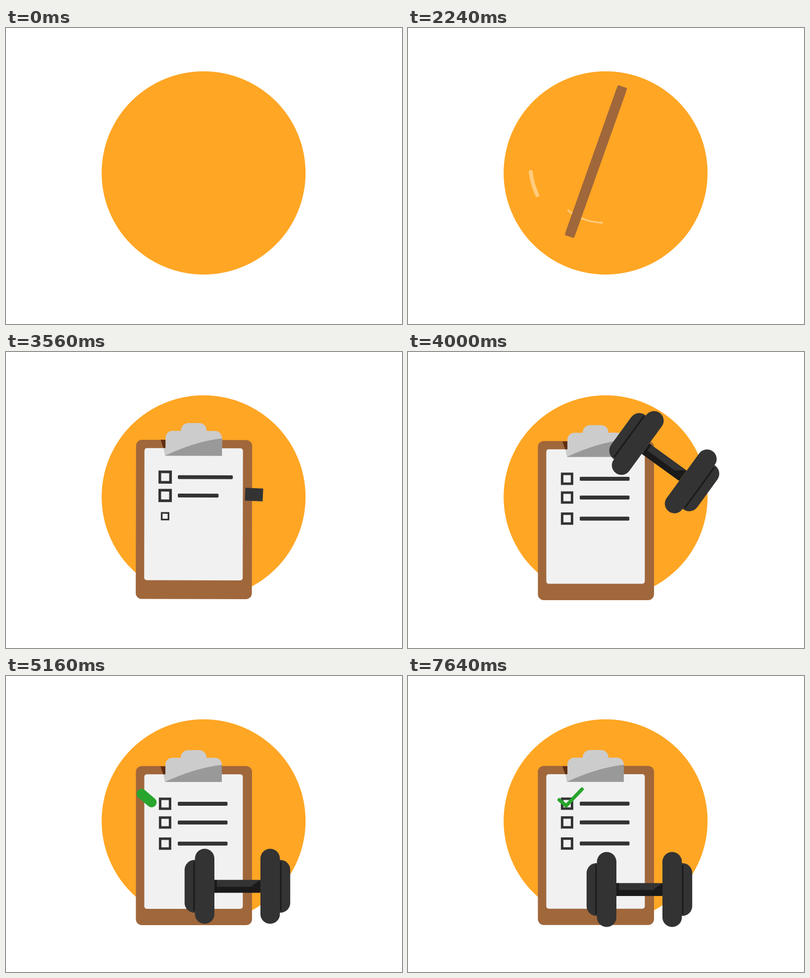
An HTML page with a canvas that plays this animation: 800x600 px, repeating every 7.68 s.

```html
<!DOCTYPE html>
<html lang="en">
<head>
<meta charset="utf-8">
<title>Workout checklist</title>
<style>
  html, body { margin: 0; width: 100%; height: 100%; overflow: hidden; background: #fff; }
  canvas { display: block; }
</style>
</head>
<body>
<canvas id="stage" width="800" height="600"></canvas>
<script>
const ctx = document.getElementById('stage').getContext('2d');
const LOOP = 7680, STEP = 40, TURN = 2 * Math.PI;
const DARK = '#333', SHADE = '#1a1a1a';
const rad = degrees => degrees * Math.PI / 180;

// Motion rules: each takes the time and returns a progress or an offset.
const progress = (t, start, end) => Math.min(1, Math.max(0, (t - start) / (end - start)));

function ease(t, start, end) {
  const u = progress(t, start, end);
  return u * u * (3 - 2 * u);
}

const fall = (t, start, end) => progress(t, start, end) ** 1.6;

function pop(t, start) {
  const u = Math.max(0, t - start) / 400;
  return 1 - Math.exp(-5 * u) * Math.cos(TURN * u);
}

function wobble(t, start, period) {
  const u = Math.max(0, t - start) / period;
  return Math.sin(TURN * u) * Math.exp(-0.9 * u);
}

// Drawing helpers.
function group(draw) {
  ctx.save();
  draw();
  ctx.restore();
}

function scaleAt(x, y, sx, sy) {
  ctx.translate(x, y);
  ctx.scale(sx, sy);
  ctx.translate(-x, -y);
}

function box(x, y, w, h, r, color) {
  ctx.fillStyle = color;
  ctx.beginPath();
  ctx.roundRect(x, y, w, h, r);
  ctx.fill();
}

function polygon(color, ...points) {
  ctx.fillStyle = color;
  ctx.beginPath();
  points.forEach(p => ctx.lineTo(...p));
  ctx.fill();
}

// A light arc whose head runs ahead of its tail.
function streak(t, start, duration, radius, width, from, sweep) {
  const u = (t - start) / duration;
  if (u <= 0 || u >= 1) return;
  ctx.strokeStyle = '#ffcb7c';
  ctx.lineWidth = width;
  ctx.lineCap = 'round';
  ctx.beginPath();
  ctx.arc(397, 275, radius, rad(from + sweep * ease(u, 0.35, 1)), rad(from + sweep * ease(u, 0, 0.65)));
  ctx.stroke();
}

function burst(t, start, duration, from, sweep) {
  streak(t, start, duration, 120, 3.5, from, sweep);
  streak(t, start, duration, 150, 8, from + sweep + 17, sweep * 0.52);
}

function drawStreaks(t) {
  burst(t, 80, 720, 180, 115);
  streak(t, 360, 600, 65, 3.5, -180, 133);
  burst(t, 1040, 560, -12, 87);
  burst(t, 2040, 400, 85.5, 49);
}

function drawRow(t, y, i) {
  const start = 3360 + 72 * i;
  const size = pop(t, start), length = pop(t, start + 57);
  if (size > 0) group(() => {
    scaleAt(321.4, y, size, size);
    ctx.strokeStyle = DARK;
    ctx.lineWidth = 5;
    ctx.strokeRect(311.4, y - 10, 20, 20);
  });
  if (length > 0) box(347, y - 4, 100.5 * length, 8, 2, DARK);
}

function drawPaper(t) {
  scaleAt(379, 199, 1, ease(t, 3100, 3600));
  box(279.4, 199, 199, 272.7, 5, '#f1f1f1');
  [258.8, 296.8, 339.6].forEach((y, i) => drawRow(t, y, i));
}

function drawClip(t) {
  scaleAt(379, 214.5, 1, pop(t, 3310));
  polygon('#5e2d12', [312, 183], [322, 183], [322, 200], [318, 200]);
  polygon('#ccc', [318, 199], [323, 199], [323, 214.5], [321, 214.5]);
  box(353, 150, 52, 30, [15, 15, 0, 0], '#ccc');
  box(322, 165.5, 114, 49, [14, 14, 0, 0], '#ccc');
  ctx.fillStyle = '#999';
  ctx.beginPath();
  ctx.moveTo(321, 214.5);
  ctx.quadraticCurveTo(382, 186, 436, 180);
  ctx.lineTo(436, 214.5);
  ctx.fill();
}

function drawBoard(t) {
  const y = 271 - 11 * ease(t, 2200, 2600) + 83.5 * fall(t, 2840, 3180) + 9.5 * wobble(t, 3180, 460);
  const tilt = 19.5 * (1 - ease(t, 2440, 2840)) - 1.5 * wobble(t, 2840, 260);
  ctx.translate(379.7, y);
  ctx.rotate(rad(tilt));
  ctx.scale(ease(t, 2200, 2420), 1);
  ctx.translate(-379.7, -343.5);
  box(262.4, 182.3, 234.6, 322.5, 12, '#a0673b');
  group(() => drawPaper(t));
  group(() => drawClip(t));
}

function drawPlates(t, side) {
  const outer = pop(t, 3740), inner = pop(t, 3620);
  ctx.scale(side, 1);
  group(() => {
    scaleAt(66, 0, outer, outer);
    box(64, -53.5, 42.7, 107, 20, DARK);
    box(86, -50, 3, 100, 1, SHADE);
  });
  group(() => {
    scaleAt(66, 0, inner, inner);
    box(46.5, -76, 39.3, 152, 19.6, DARK);
  });
}

function drawDumbbell(t) {
  const rise = ease(t, 3480, 3960), swing = ease(t, 4260, 4840);
  ctx.translate(499.7 + 18 * rise - 50.2 * swing,
    294.5 - 73.5 * rise + 212 * fall(t, 3960, 4640) + 15 * wobble(t, 4640, 640));
  ctx.rotate(rad(36 * (rise - swing)));
  group(() => {
    ctx.scale(pop(t, 3530), 1);
    box(-46.5, -13, 93, 26, 2, DARK);
    ctx.globalAlpha = ease(t, 3600, 3720);
    box(-46.5, -13, 5, 26, 0, SHADE);
    box(-46.5, 1, 93, 12, 0, SHADE);
    polygon(SHADE, [27, 1], [46.5, -13], [46.5, 1]);
  });
  [-1, 1].forEach(side => group(() => drawPlates(t, side)));
}

function drawCheck(t) {
  const drawn = 65 * ease(t, 5060, 5480);
  if (drawn <= 0) return;
  const size = 2.95 - 1.95 * ease(t, 5060, 5860);
  scaleAt(322.4, 257.5, size, size);
  ctx.strokeStyle = '#28a52c';
  ctx.lineWidth = 7;
  ctx.lineCap = ctx.lineJoin = 'round';
  ctx.setLineDash([drawn, 100]);
  ctx.beginPath();
  ctx.moveTo(305.5, 251);
  ctx.lineTo(319.5, 263);
  ctx.lineTo(351.5, 229.5);
  ctx.stroke();
}

function render(now) {
  const t = Math.floor(now % LOOP / STEP) * STEP;
  ctx.fillStyle = '#fff';
  ctx.fillRect(0, 0, 800, 600);
  ctx.fillStyle = '#ffa624';
  ctx.beginPath();
  ctx.arc(399.2, 293.7, 206, 0, TURN);
  ctx.fill();
  [drawStreaks, drawBoard, drawDumbbell, drawCheck].forEach(part => group(() => part(t)));
}

const begin = performance.now();
function frame() {
  render(performance.now() - begin);
  requestAnimationFrame(frame);
}
frame();
</script>
</body>
</html>
```
